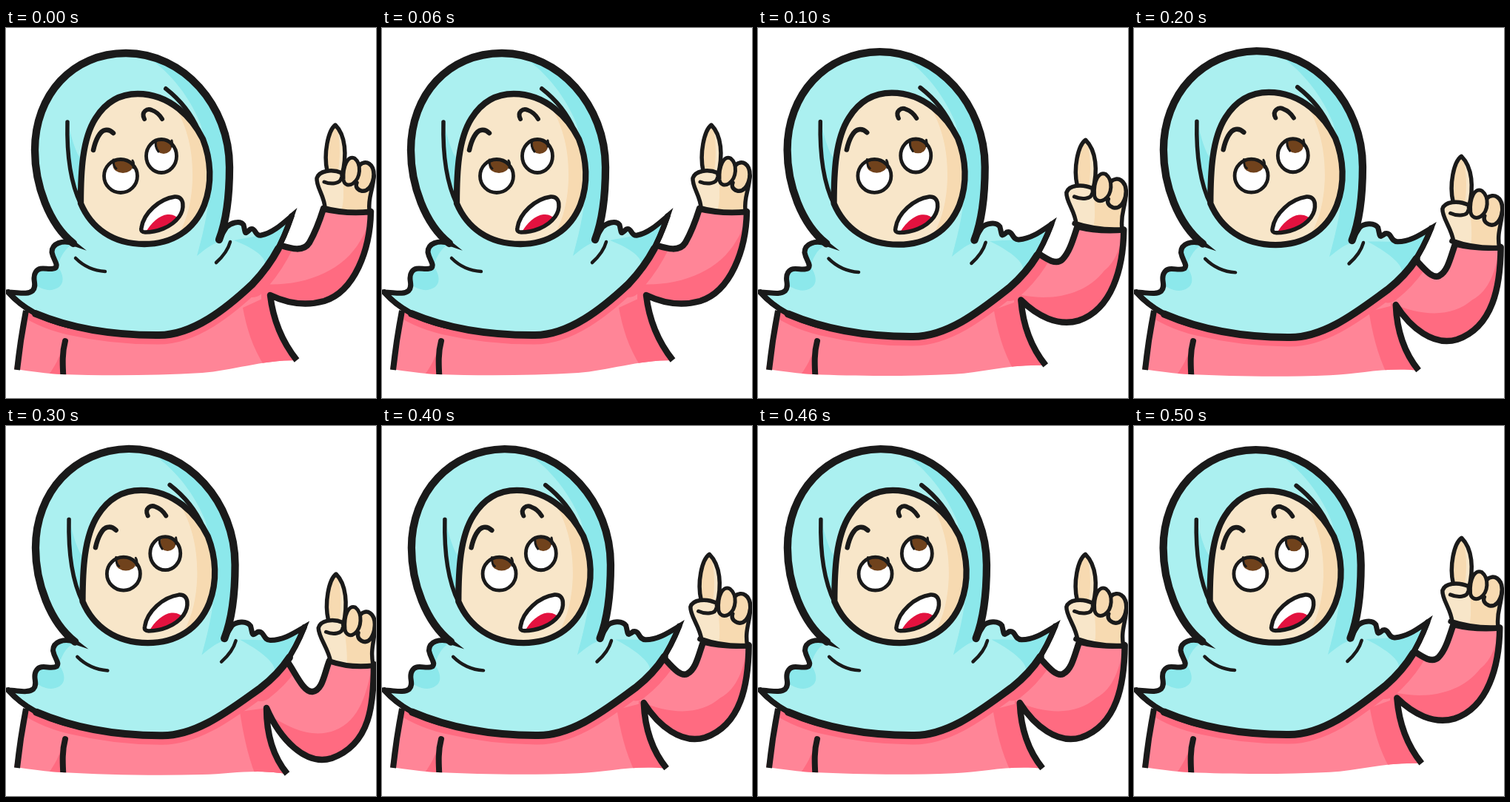
Write an HTML page with a canvas that moves like this. It is 500 by 500 pixels and loops after 600 ms.

```html
<!DOCTYPE html>
<html lang="en">
<head>
<meta charset="utf-8">
<title>Pointing up</title>
<style>
html, body { margin: 0; width: 100%; height: 100%; overflow: hidden; background: #fff; }
canvas { display: block; width: 500px; height: 500px; }
</style>
</head>
<body>
<canvas id="stage" width="500" height="500"></canvas>
<script>
const ctx = document.getElementById('stage').getContext('2d');

const INK = '#1a1a1a', PINK = '#ff8597', ROSE = '#ff6b81';
const AQUA = '#abf0f0', TEAL = '#8ce8eb', SKIN = '#f8e6c9', TAN = '#f7dab1';

// Four poses, played forth and back; each value is a share of the full swing.
const ORDER = [0, 1, 2, 3, 2, 1];
const HEAD = [0, 0.62, 0.92, 1];
const ARM = [0, 0.33, 0.65, 1];
const HAND = [0, 0.29, 0.61, 1];

const warp = (d, move) => new Path2D(d.replace(/(-?[\d.]+) (-?[\d.]+)/g,
  (_, x, y) => move(+x, +y).map(n => n.toFixed(2)).join(' ')));

function blend(a, b, w) {
  const end = b.match(/-?[\d.]+/g);
  let i = 0;
  return a.replace(/-?[\d.]+/g, n => (+n + (end[i++] - n) * w).toFixed(2));
}

function fill(path, color) {
  ctx.fillStyle = color;
  ctx.fill(path);
}

function line(path, width, color = INK, cap = 'round', join = 'round') {
  ctx.lineWidth = width;
  ctx.strokeStyle = color;
  ctx.lineCap = cap;
  ctx.lineJoin = join;
  ctx.stroke(path);
}

function inside(path, draw) {
  ctx.save();
  ctx.clip(path);
  draw();
  ctx.restore();
}

// The head swells to the right, the scarf tip also drops.
const headMove = w => (x, y) => {
  const tip = Math.max(0, (x - 305) / 82);
  return [
    x + w * (0.025 * x + 7.5 * tip),
    y + w * ((y / 60 - 3.7) * Math.min(1, x / 160) + 17.5 * tip)
  ];
};

// The hand drops and tilts a little halfway.
const handMove = w => (x, y) => {
  const u = ((y - 130) / 115) ** 4;
  const tilt = 0.06 * Math.sin(Math.PI * w);
  return [
    x + w * (1 + 7 * u * (1 - (x - 430) / 130)) - tilt * (500 - x),
    y + w * (69 + 6 * u) + tilt * (x - 440)
  ];
};

const HEM = 'M3 357 C25 382 55 395 85 402 C125 411 165 415 203 415 C252 417 300 377 333 346 C358 320 373 292 386 254';

const SCARF = HEM + ' C372 266 360 277 345 280 C336 282 338 269 330 272 C322 280 324 278 321 266 ' +
  'C316 259 303 264 298 269 C293 276 290 282 287 289 C298 260 302 227 302 188 C302 105 240 34 162 34 ' +
  'C90 34 39 90 39 165 C39 212 58 265 91 291 C76 286 62 291 62 303 C64 314 71 319 67 324 ' +
  'C59 329 46 320 40 330 C34 339 43 347 36 355 C29 361 16 357 3 357 Z';

const FACE = 'M101 237 C101 195 103 150 121 122 C136 98 157 89 178 89 C222 89 252 122 266 150 ' +
  'C277 178 279 210 268 239 C254 274 224 292 187 292 C144 292 115 270 101 237 Z';

const SLEEVE = [
  'M372 294 C385 298 402 303 410 290 C418 276 424 260 429 244 C450 249 472 250 493 248 ' +
  'C492 300 471 356 430 369 C405 376 380 372 357 361 C361 395 374 425 393 449',
  'M380 318 C392 335 402 360 414 359 C428 357 430 335 437 317 C455 322 475 323 497 322 ' +
  'C497 375 493 430 440 449 C405 460 370 423 352 381 C352 415 361 447 380 470'
];
const BASE = [
  ' C345 449 305 463 265 466 C200 470 130 470 75 468 C55 467 35 464 11 461 L25 382 L200 340 L340 290 Z',
  ' C335 463 305 470 265 471 C200 473 130 471 75 468 C55 467 35 464 11 461 L25 382 L200 340 L340 290 Z'
];
const ARM_SHADE = [
  'M345 346 C400 350 455 330 479 287 C487 275 491 262 493 250 L510 250 L510 400 L345 400 Z',
  'M348 385 C390 415 420 421 445 411 C478 398 488 360 495 322 L510 322 L510 470 L348 470 Z'
];
const SIDE_SHADE = [
  'M320 378 C325 405 333 432 350 458 L400 470 L400 400 L357 361 Z',
  'M316 386 C320 412 326 445 338 474 L390 480 L390 430 L352 381 Z'
];

function drawBody(arm, at, hem) {
  const mix = pair => blend(pair[0], pair[1], arm);
  const sleeve = mix(SLEEVE);
  const body = new Path2D(sleeve + mix(BASE));
  fill(body, PINK);
  inside(body, () => {
    fill(new Path2D(mix(ARM_SHADE)), ROSE);
    fill(new Path2D(mix(SIDE_SHADE)), ROSE);
    fill(new Path2D('M76 432 C72 446 66 457 57 470 L80 472 Z'), ROSE);
    line(hem, 25, ROSE);
    line(at('M333 346 C358 320 373 292 386 254'), 36, ROSE);
    line(new Path2D('M80 423 C76 438 76 452 78 480'), 8);
  });
  line(new Path2D('M27 382 C22 408 18 434 15 462'), 8, INK, 'butt');
  line(new Path2D(sleeve), 8.5, INK, 'butt');
}

function drawScarf(at, hem) {
  const scarf = at(SCARF);
  fill(scarf, AQUA);
  inside(scarf, () => {
    fill(at('M190 38 C215 55 245 85 263 130 C280 190 280 230 258 308 C270 298 280 291 288 289 ' +
      'C298 260 302 227 302 188 C302 130 256 55 190 38 Z'), TEAL);
    fill(at('M83 126 C90 155 98 180 104 176 L101 238 C88 205 80 165 83 126 Z'), TEAL);
    fill(at('M62 294 L92 291 C82 296 74 306 70 322 Z'), TEAL);
    fill(at('M70 322 C79 335 81 350 62 354 C52 355 44 350 38 346 L40 322 L66 324 Z'), TEAL);
    fill(at('M388 250 C372 280 340 280 308 287 C332 296 352 309 350 320 C347 333 336 344 322 358 L375 310 Z'), TEAL);
  });
  line(scarf, 7, INK, 'round', 'miter');
  line(at('M91 291 C58 265 39 212 39 165 C39 90 90 34 162 34 C240 34 302 105 302 188 C302 227 298 260 288 286'), 10.3);
  line(hem, 7.5);
  line(at('M40 386 C100 411 160 415 203 415 C252 417 300 377 333 346 C350 328 360 313 368 298'), 10);
  line(at('M94 311 C105 322 117 328 134 329'), 4.5);
  line(at('M303 289 C300 300 293 309 284 317'), 4.5);
}

function drawEye(at, x, y, rx, ry, ix, iy, irx, iry) {
  const [cx, cy] = at(x, y), [px, py] = at(ix, iy);
  const oval = (...e) => {
    const p = new Path2D();
    p.ellipse(...e, 0, 0, 7);
    return p;
  };
  const eye = oval(cx, cy, rx, ry);
  fill(eye, '#fff');
  inside(eye, () => fill(oval(px, py, irx, iry), '#70421c'));
  line(eye, 4.8);
}

function drawFace(at, move) {
  const face = at(FACE);
  fill(face, SKIN);
  inside(face, () => fill(at('M222 95 C245 130 253 165 252 205 C251 232 246 255 234 278 L290 270 L290 130 Z'), TAN));
  line(face, 8.3);
  line(at('M83 127 C82 168 86 207 101 238'), 5.5);
  line(at('M216 82 C234 96 250 115 260 138'), 6);

  line(at('M118 165 C121 151 127 139 134 138 C139 137 143 140 145 142'), 6.5);
  line(at('M187 123 C182 113 191 108 197 111 C203 113 208 118 211 123'), 6);
  drawEye(move, 155, 200, 22.5, 22.5, 158, 186, 13.5, 10);
  drawEye(move, 210, 173, 20.5, 22.5, 213, 160, 11, 10);
  line(at('M145 178 C145 184 146 188 149 190'), 3);
  line(at('M171 179 C173 182 173 185 172 189'), 3);
  line(at('M203 152 C201 158 203 163 206 167'), 3);
  line(at('M224 152 C225 155 225 157 224 160'), 3);

  const mouth = at('M183 270 C186 250 207 231 228 228 C242 227 241 245 234 255 C223 270 203 276 188 276 C184 276 182 274 183 270 Z');
  fill(mouth, '#fff');
  inside(mouth, () => fill(at('M188 278 C194 265 207 253 218 252 C225 252 229 253 233 258 L220 280 Z'), '#e3123f'));
  line(mouth, 5.5);
}

function drawHand(at) {
  const index = at('M434 193 C429 170 435 139 445 131 C459 145 461 172 454 199');
  const palm = at('M431 244 C431 228 419 215 420 203 C423 193 440 190 454 194 L478 186 C488 176 498 184 497 203 C496 220 486 226 491 248 C470 250 450 249 431 244 Z');
  fill(index, TAN);
  fill(palm, SKIN);
  inside(index, () => fill(at('M446 130 C452 150 453 175 447 205 L465 200 L465 140 Z'), SKIN));
  inside(palm, () => fill(at('M456 210 C456 224 457 237 452 250 L500 252 L500 205 L482 220 Z'), TAN));
  line(at('M431 244 C431 228 419 215 420 203 C423 193 440 190 454 196'), 5.5);
  line(index, 5.5);
  line(at('M430 208 C440 212 452 210 453 203'), 5);

  const ring = at('M477 186 C486 177 498 183 497 201 C495 214 488 222 480 220 C474 218 472 214 474 209');
  const middle = at('M456 205 C455 186 462 172 471 176 C481 184 479 203 469 210 C463 214 457 212 456 205 Z');
  fill(ring, TAN);
  line(ring, 5.5);
  fill(middle, TAN);
  line(middle, 5);
  line(at('M497 200 C496 220 489 228 491 247'), 5.5);
  line(at('M429 243 C450 249 472 250 492 248'), 7);
}

function draw(pose) {
  ctx.fillStyle = '#fff';
  ctx.fillRect(0, 0, 500, 500);
  const move = headMove(HEAD[pose]);
  const at = d => warp(d, move);
  const hem = at(HEM);
  drawBody(ARM[pose], at, hem);
  drawScarf(at, hem);
  drawFace(at, move);
  const grip = handMove(HAND[pose]);
  drawHand(d => warp(d, grip));
}

function tick() {
  draw(ORDER[Math.floor(performance.now() / 100) % ORDER.length]);
  requestAnimationFrame(tick);
}
tick();
</script>
</body>
</html>
```
